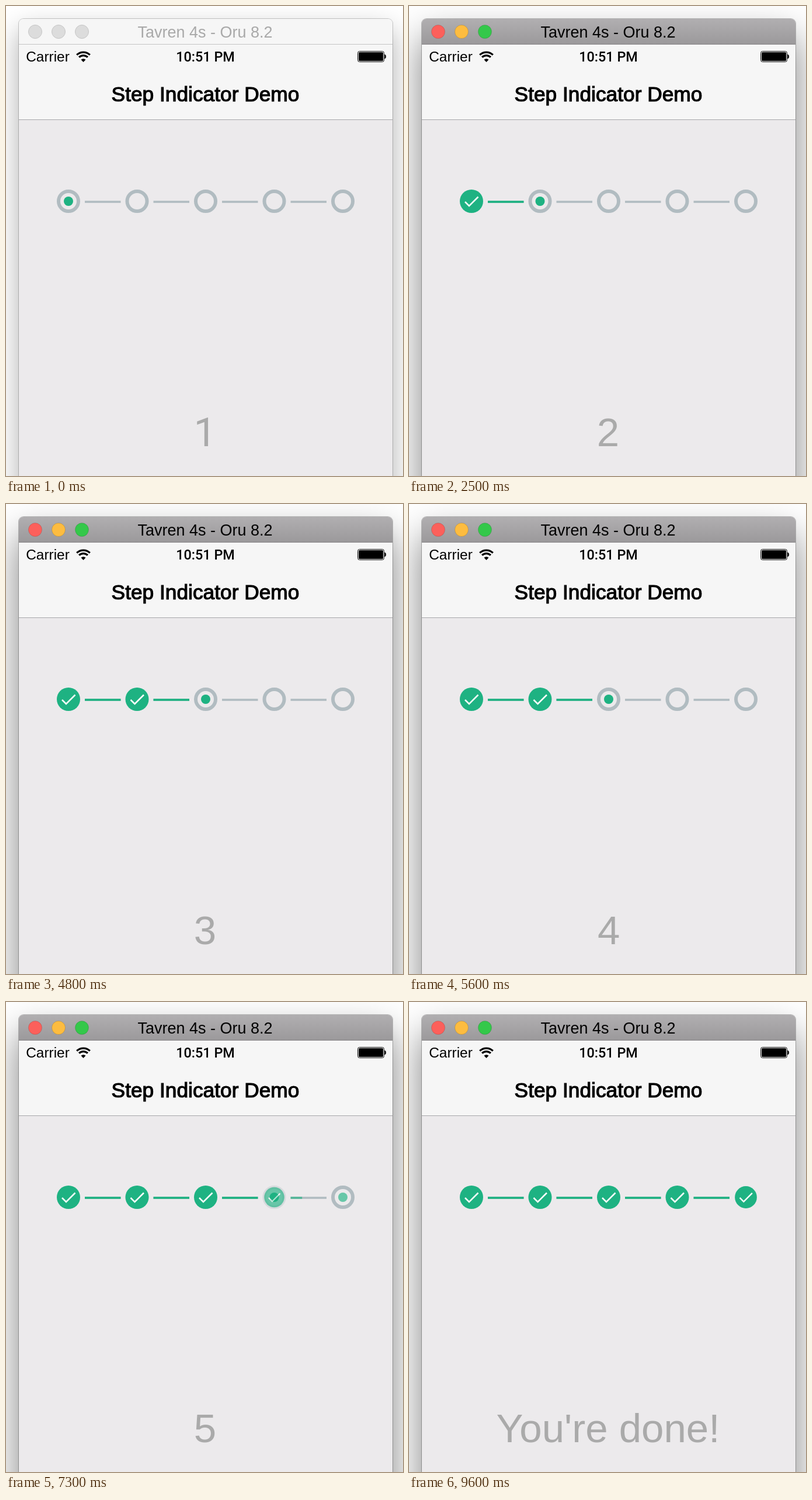
An HTML page for the animation above (9800 ms loop, 680x804 px).

```html
<!DOCTYPE html>
<html lang="en">
<head>
<meta charset="utf-8">
<title>Step Indicator Demo</title>
<style>
html, body { margin: 0; width: 100%; height: 100%; overflow: hidden; background: #fff; }
#stage { position: relative; width: 100%; height: 100%; overflow: hidden; contain: strict; }
#win {
  position: absolute; left: 22px; top: 22px; width: 640px; height: 1000px;
  border-radius: 8px 8px 0 0; background: #eceaec;
  box-shadow: 0 0 0 1px rgba(0,0,0,.2), 0 20px 48px rgba(0,0,0,.32);
}
.active #win { box-shadow: 0 0 0 1px rgba(0,0,0,.25), 0 32px 64px rgba(0,0,0,.5); }
svg { position: absolute; left: 0; top: 0; }
text { font-family: "Liberation Sans", Arial, sans-serif; text-anchor: middle; }
.digit { font-family: Roboto, sans-serif; }
#bar { fill: #f6f6f6; }
#edge { fill: #c4c4c4; }
#title { fill: #a9a9a9; font-size: 27px; }
#lights circle { fill: #dcdcdc; stroke: #c6c6c6; }
.active #bar { fill: url(#metal); }
.active #edge { fill: #858385; }
.active #title { fill: #000; }
.active #lights circle { fill: var(--c); stroke: rgba(0,0,0,.14); }
#pages { font-size: 69px; fill: #aaa; }
</style>
</head>
<body>
<div id="stage">
<div id="win"></div>
<svg width="680" height="804" viewBox="0 0 680 804">
  <defs>
    <linearGradient id="metal" x2="0" y2="1">
      <stop stop-color="#b1afb1"/><stop offset="1" stop-color="#9b999b"/>
    </linearGradient>
    <clipPath id="view"><rect x="22" y="195" width="640" height="609"/></clipPath>
  </defs>

  <path id="bar" d="M22 66V30a8 8 0 0 1 8-8H654a8 8 0 0 1 8 8V66Z"/>
  <rect id="edge" x="22" y="65" width="640" height="1"/>
  <g id="lights">
    <circle cx="50" cy="44" r="11.5" style="--c:#fc605b"/>
    <circle cx="90" cy="44" r="11.5" style="--c:#fdbc40"/>
    <circle cx="130" cy="44" r="11.5" style="--c:#34c84a"/>
  </g>
  <text id="title" x="341" y="54">Tavren 4s - Oru 8.2</text>

  <rect x="22" y="66" width="640" height="128" fill="#f6f6f6"/>
  <rect x="22" y="194" width="640" height="1" fill="#a7a6a9"/>
  <text x="71.5" y="95" font-size="24.4">Carrier</text>
  <path d="M132.5 96l-4-4.2a5.8 5.8 0 0 1 8 0Z"/>
  <g fill="none" stroke="#000" stroke-width="3.2">
    <path d="M125.1 87.6a10.5 10.5 0 0 1 14.8 0"/>
    <path d="M121.2 83.7a16 16 0 0 1 22.6 0"/>
  </g>
  <text class="digit" x="341.5" y="95" font-size="23.4" font-weight="500">10:51 PM</text>
  <rect x="602.5" y="77.5" width="45" height="18" rx="3" fill="#fff" stroke="#000"/>
  <rect x="604" y="79" width="42" height="15" rx="1.5"/>
  <path d="M649 83a3 4 0 0 1 0 7Z" stroke="#000"/>
  <text x="341.5" y="163" font-size="35.3" stroke="#000" stroke-width="1.2">Step Indicator Demo</text>

  <g id="steps"></g>
  <g clip-path="url(#view)"><g id="pages"></g></g>
</svg>
</div>
<script>
const LOOP = 9800, FRAME = 100, PAGE = 640, GREEN = '#1eb282', GREY = '#b1bcc1';
const labels = ['1', '2', '3', '4', '5', "You're done!"];
// Each swipe: release time, distance left then, time the step finishes
const swipes = [
  [1600, 493, 2000], [3000, 143, 3540], [5000, 240, 5640],
  [6800, 228, 7140], [8500, 436, 9240]
];
const $ = id => document.getElementById(id);
const clamp = v => Math.max(0, Math.min(1, v));

function add(parent, tag, attrs) {
  const el = document.createElementNS('http://www.w3.org/2000/svg', tag);
  for (const k in attrs) el.setAttribute(k, attrs[k]);
  return parent.appendChild(el);
}

labels.forEach((s, i) => {
  add($('pages'), 'text', { x: 341 + PAGE * i, y: 753, class: s === '1' ? 'digit' : '' }).textContent = s;
});

const steps = swipes.map((_, i) => {
  const g = add($('steps'), 'g', { transform: `translate(${107 + 117.5 * i} 334)` });
  const ring = add(g, 'circle', { r: 17, fill: 'none', stroke: GREY, 'stroke-width': 6 });
  const dot = add(g, 'circle', { r: 8, fill: GREEN });
  const full = add(g, 'g', {});
  add(full, 'circle', { r: 20, fill: GREEN });
  add(full, 'path', { d: 'M-11 1L-4 8L11.5-7.5', fill: 'none', stroke: '#fff', 'stroke-width': 2.5 });
  let line;
  if (i < 4) {
    const bar = { x: 28, y: -0.8, width: 61.5, height: 3.6 };
    add(g, 'rect', { ...bar, fill: GREY });
    line = add(g, 'rect', { ...bar, fill: GREEN });
  }
  return { ring, dot, full, line };
});

function draw(t) {
  document.body.className = t >= 1600 ? 'active' : '';

  let scroll = 0;
  for (const [start, left, end] of swipes)
    if (t >= start) scroll += PAGE - (t < end ? left * Math.exp((start - t) / 114) : 0);
  $('pages').setAttribute('transform', `translate(${-scroll} 0)`);

  let shown = 1;
  steps.forEach(({ ring, dot, full, line }, i) => {
    const age = t - swipes[i][2], fade = clamp(age / 250), grow = clamp(age / 500);
    ring.setAttribute('opacity', 1 - fade);
    dot.setAttribute('opacity', shown);
    full.setAttribute('opacity', fade);
    full.setAttribute('transform', `scale(${0.8 + 0.2 * grow})`);
    if (line) {
      line.setAttribute('opacity', fade);
      line.setAttribute('width', 61.5 * grow);
    }
    shown = fade;
  });
}

const origin = performance.now();
function tick() {
  const t = (performance.now() - origin) % LOOP;
  draw(Math.floor(t / FRAME) * FRAME);
  requestAnimationFrame(tick);
}
tick();
</script>
</body>
</html>
```
